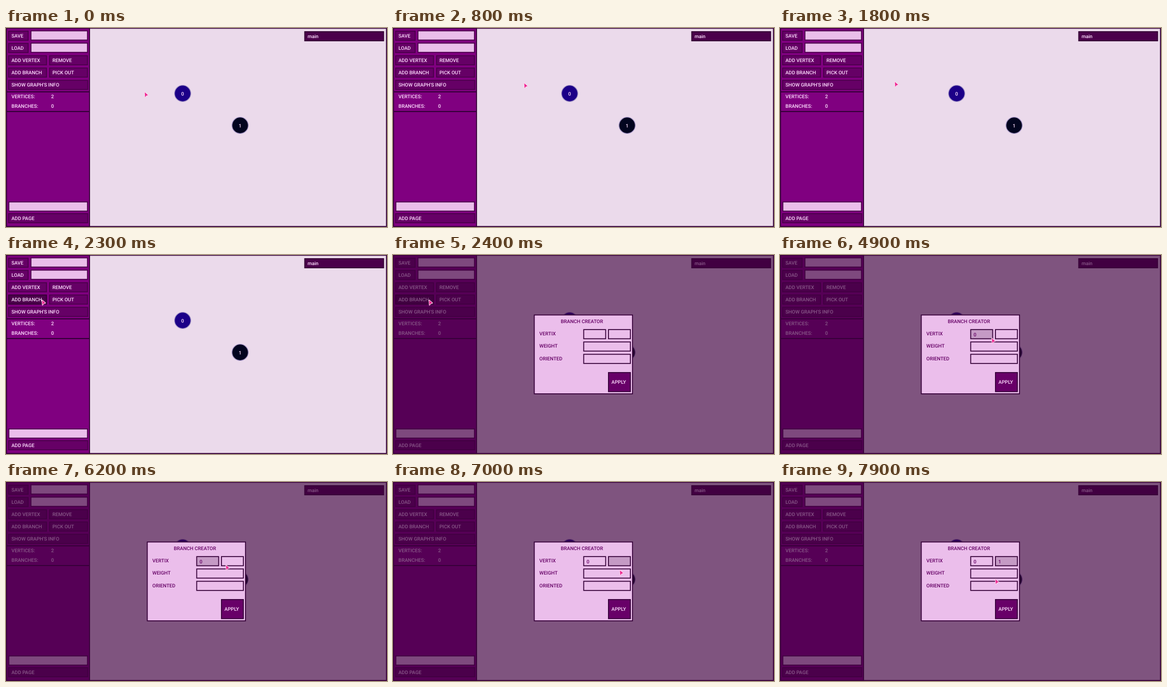
An HTML page that plays this animation: 716 px wide and 374 px high, repeating every 8 s.

```html
<!DOCTYPE html>
<html lang="en">
<head>
<meta charset="utf-8">
<title>Graph editor</title>
<style>
html, body { margin: 0; width: 100%; height: 100%; overflow: hidden; background: #ebdaeb; }
svg { display: block; width: 716px; height: 374px; }
text { font: 500 9.25px Roboto, sans-serif; fill: #ffe0ff; text-rendering: geometricPrecision; white-space: pre; }
.button { fill: #660066; stroke: #4a004a; stroke-width: 1.7; }
.pressed { fill: #4b004b; stroke: #320032; }
.input { fill: #eabeea; stroke: #4a004a; stroke-width: 1.7; }
.field { fill: #ebbeeb; stroke: #350038; stroke-width: 1.7; }
.focus { fill: #c59ac5; }
.apply { fill: #680068; }
.line { fill: none; stroke: #350038; stroke-width: 1.8; }
.vertex { stroke: #a596c6; stroke-width: 1.3; }
.mid { text-anchor: middle; }
.ink { fill: #650065; }
#cursor { fill: #ec2590; stroke: #ffd6f0; stroke-width: 2; paint-order: stroke; stroke-linejoin: round; }
</style>
</head>
<body>
<svg viewBox="0 0 716 374">
  <rect width="716" height="374" fill="#ebdaeb"/>
  <rect width="157" height="374" fill="#800080"/>
  <g id="page"></g>
  <path class="line" d="M1 120H157M1 157H157M157 0V374"/>
  <rect class="line" x="1" y=".5" width="714" height="372.5"/>
  <g id="modal">
    <rect width="716" height="374" fill="#3c003c" fill-opacity=".61"/>
    <g id="form"></g>
  </g>
  <path id="cursor" d="M0 0L6 5.2L3 6L.6 9Z"/>
</svg>
<script>
const $ = id => document.getElementById(id);
const NS = "http://www.w3.org/2000/svg";

function add(parent, tag, attrs, content = "") {
  const el = document.createElementNS(NS, tag);
  for (const key in attrs) el.setAttribute(key, attrs[key]);
  el.textContent = content;
  return $(parent).appendChild(el);
}

// Positions are outer edges; the border lies inside.
const box = (parent, cls, x, y, width, height = 19) =>
  add(parent, "rect", { class: cls, x: x + .9, y: y + .9, width: width - 1.8, height: height - 1.8 });

// Labels are placed by the vertical middle of their capitals.
const label = (parent, content, x, y, cls = "") =>
  add(parent, "text", { class: cls, x, y: y + 3.3 }, content);

function button(content, x, y, width, cls = "button") {
  const rect = box("page", cls, x, y, width);
  label("page", content, x + 6.2, y + 9.7);
  return rect;
}

// Sidebar
const left = 4, right = 81, full = 150.5, half = 73;
const row = i => 5 + 23.1 * i;

["SAVE", "LOAD"].forEach((name, i) => {
  button(name, left, row(i), 38.5);
  box("page", "input", 46, row(i) - .5, 108);
});
button("ADD VERTEX", left, row(2), half);
button("REMOVE", right, row(2), half);
const addBranch = button("ADD BRANCH", left, row(3), half);
button("PICK OUT", right, row(3), half);
button("SHOW GRAPH'S INFO", left, row(4), full);
[["VERTICES:", "2"], ["BRANCHES:", "0"]].forEach(([name, count], i) => {
  const y = 128.2 + 18.7 * i;
  label("page", name, 10.3, y);
  label("page", count, 84.8, y);
});
box("page", "input", left + .5, 326, full - 1);
button("ADD PAGE", left, 348, full);
button("main", 560.5, 6, full - .5, "button pressed");

// Graph
function vertex(name, cx, cy, fill) {
  add("page", "circle", { class: "vertex", cx, cy, r: 15.3, fill });
  label("page", name, cx, cy + .3, "mid");
}
vertex("0", 332, 123, "#1c0088");
vertex("1", 440, 183, "#02051f");

// Branch creator
const formRow = i => 139.3 + 23.2 * i;

box("form", "field", 264.6, 111.8, 186.4, 150);
label("form", "BRANCH CREATOR", 355, 124.8, "mid ink");
["VERTIX", "WEIGHT", "ORIENTED"].forEach((name, i) => {
  label("form", name, 275, formRow(i) + 8.6, "ink");
  if (i) box("form", "field", 357.5, formRow(i), 89.5);
});
const [from, to] = [357.5, 404].map(x => ({
  box: box("form", "field", x, formRow(0), 43),
  text: label("form", "", x + 6.2, formRow(0) + 10.6, "ink")
}));
box("form", "field apply", 404, 220, 43, 37.7);
label("form", "APPLY", 424.2, 239, "mid");

// The pointer first swings sideways, then makes straight moves: start, duration, x, y
const swingEnd = 900;
const moves = [
  [900, 100, 216, 101.5],
  [1800, 400, 68, 85],
  [2400, 700, 357, 151],
  [3200, 300, 371.5, 152.5],
  [4700, 400, 425, 161],
  [5100, 100, 413.5, 156.5],
  [6800, 300, 433, 171],
  [7100, 200, 409, 182],
  [7400, 500, 405, 183]
];

function pointer(t) {
  const k = Math.min(t / swingEnd, 1);
  let x = 212 + 128 * Math.sin(2.75 + 7.2 * k);
  let y = 121 - 19 * k;
  for (const [start, duration, toX, toY] of moves) {
    const part = Math.min(Math.max((t - start) / duration, 0), 1);
    x += (toX - x) * part;
    y += (toY - y) * part;
  }
  return [x, y];
}

function draw() {
  const t = Math.floor(performance.now() % 8000 / 100) * 100;
  const during = (a, b) => t >= a && t < b;
  $("cursor").setAttribute("transform", `translate(${pointer(t)})`);
  $("modal").style.display = t < 2400 ? "none" : "";
  addBranch.classList.toggle("pressed", during(2300, 3400));
  from.box.classList.toggle("focus", during(3400, 6500));
  to.box.classList.toggle("focus", t >= 6500);
  from.text.textContent = t < 4300 ? "" : during(5400, 6200) ? "01" : "0";
  to.text.textContent = t < 7500 ? "" : "1";
  requestAnimationFrame(draw);
}
draw();
</script>
</body>
</html>
```
